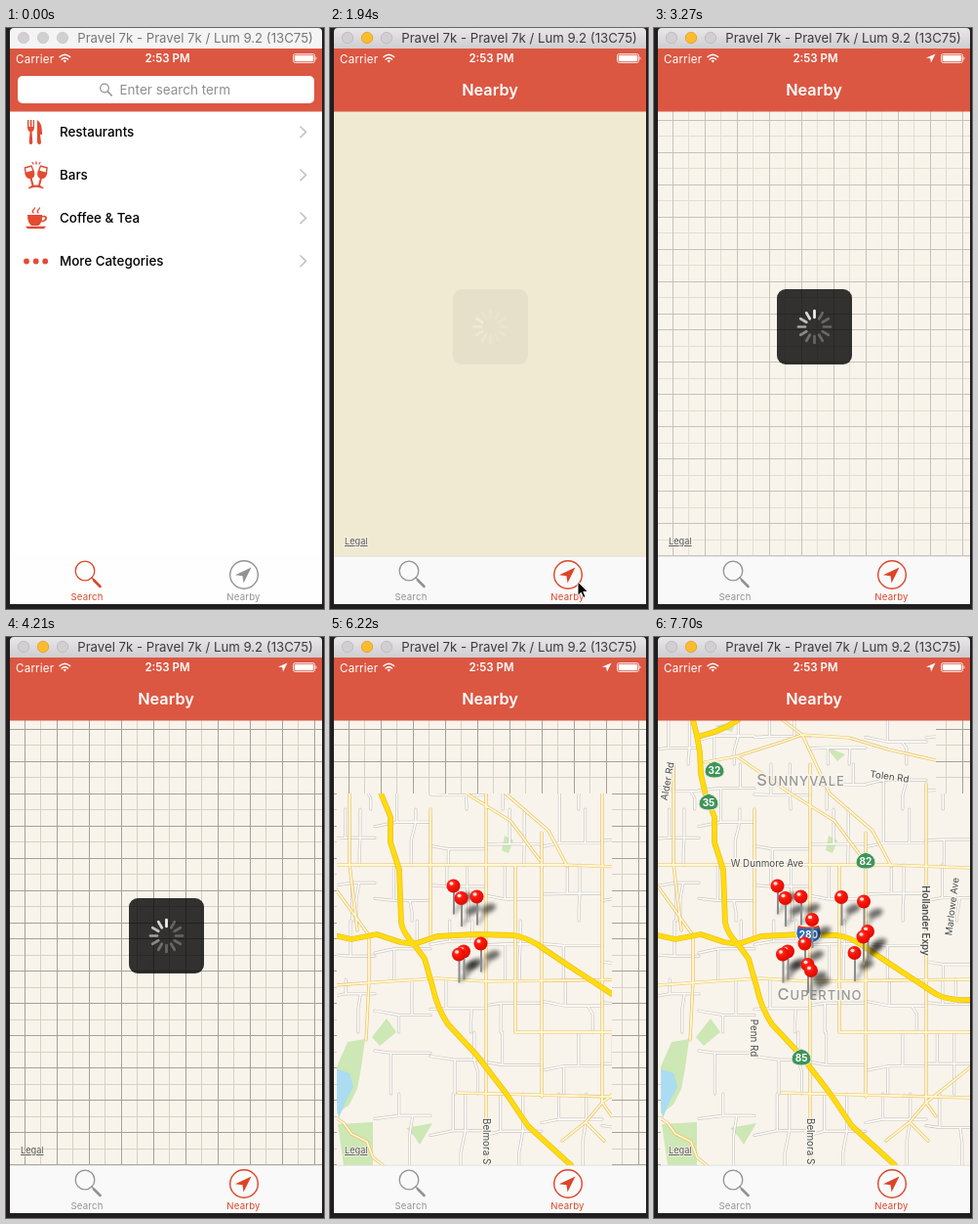
Write an HTML page that moves like this. It is 326 px wide and 594 px high and loops after 7990 ms.

```html
<!DOCTYPE html>
<html lang="en">
<head>
<meta charset="utf-8">
<title>Nearby places</title>
<style>
html, body { margin: 0; width: 100%; height: 100%; overflow: hidden; background: #211e20; }
svg { display: block; width: 326px; height: 594px; font-family: Inter, Roboto, sans-serif; }
.mid { text-anchor: middle; }
.row { font-size: 13.4px; font-weight: 500; fill: #000; }
.tab { font-size: 9.6px; letter-spacing: .2px; text-anchor: middle; }
.road { font-size: 9.8px; fill: #4c4c4c; }
.city { font-size: 13px; font-weight: 500; fill: #979797; letter-spacing: 1px; }
.city tspan { font-size: 16.5px; }
.road, .city { stroke: #f9f6ee; stroke-width: 2.5px; paint-order: stroke; text-anchor: middle; }
.sign { font-size: 10px; font-weight: 700; fill: #fff; text-anchor: middle; }
.line { fill: none; stroke-linecap: round; stroke-linejoin: round; }
</style>
</head>
<body>
<svg viewBox="0 0 326 594">
  <defs>
    <linearGradient id="chrome" x2="0" y2="1"><stop stop-color="#e9e7e9"/><stop offset="1" stop-color="#cfcdcf"/></linearGradient>
    <radialGradient id="ball" cx=".36" cy=".32" r=".75"><stop stop-color="#ff5145"/><stop offset=".4" stop-color="#fb1508"/><stop offset="1" stop-color="#d60b04"/></radialGradient>
    <filter id="soft" x="-60%" y="-60%" width="220%" height="220%"><feGaussianBlur stdDeviation="2.2"/></filter>
    <clipPath id="mapBox"><rect x="4" y="85" width="320" height="455"/></clipPath>
    <clipPath id="tileBox"><path id="tiles"/></clipPath>
  </defs>

  <rect width="326" height="594" fill="#211e20"/>
  <rect x="4" y="21" width="320" height="568" fill="#fff"/>

  <g id="list">
    <g fill="#e34b32">
      <path d="M22 94v8q0 3 2.500 4l-.8 11q0 2 1.800 2t1.800-2l-.8-11q2.500-1 2.500-4v-8h-1.200v7h-1.400v-7h-1.600v7h-1.400v-7z"/>
      <path d="M32 94q5 3 5 13v2h-2l1 8q0 2-1.800 2t-2.200-2z"/>
      <path d="M22 191h15v1q5-1 5 2.500t-6 4q-1 2.500-3 3.500h-7q-4-3-4-11zM37.300 193.500l-.6 3.500q3.300-.6 3.300-2.500t-2.700-1z" fill-rule="evenodd"/>
      <path d="M20 202.800h21l-2 2.400H22z"/>
      <circle cx="21" cy="238.500" r="2.900"/><circle cx="30.700" cy="238.500" r="2.900"/><circle cx="40.200" cy="238.500" r="2.900"/>
      <g id="glass" transform="translate(25 151) rotate(-14)">
        <path d="M-4-10h8l1 7q0 5-4 6v7l4 1.500v1h-10v-1l4-1.500v-7q-4-1-4-6zM-2.800-8.500l-.5 4h6.600l-.5-4z" fill-rule="evenodd"/>
      </g>
      <use href="#glass" transform="matrix(-1 0 0 1 61.500 0)"/>
    </g>
    <path class="line" d="M28 189q-1.500-1.500 0-3t1.500-2M33 189q-1.500-1.500 0-3t1.500-2M28 139l-1-1.500M31 139v-2M34 139l1-1.500" stroke="#e34b32" stroke-width="1.300"/>
    <g class="row">
      <text x="55" y="111">Restaurants</text><text x="55" y="155">Bars</text>
      <text x="55" y="199">Coffee &amp; Tea</text><text x="55" y="243">More Categories</text>
    </g>
    <path class="line" d="M302 101l5.500 5.300-5.500 5.300m0 33.400l5.500 5.300-5.500 5.300m0 33.400l5.500 5.300-5.500 5.300m0 33.400l5.500 5.300-5.500 5.300" stroke="#c4c4c7" stroke-width="1.700"/>
  </g>

  <g id="near" clip-path="url(#mapBox)">
    <rect id="land" x="4" y="85" width="320" height="455"/>
    <g id="grid"></g>
    <g id="map" clip-path="url(#tileBox)"></g>
    <g id="labels">
      <text class="city" x="150.500" y="152"><tspan>S</tspan>UNNYVALE</text>
      <text class="city" x="170" y="371"><tspan>C</tspan>UPERTINO</text>
    </g>
    <text id="street" class="road" style="text-anchor:start" transform="translate(156.500 492) rotate(90)">Belmora St</text>
    <text x="15" y="528" font-size="9.200" fill="#555" text-decoration="underline" stroke="#f8f4ea" stroke-width="1.500" paint-order="stroke">Legal</text>
    <g id="pins"></g>
    <g id="hud"><rect x="126" y="267" width="77" height="77" rx="9" fill-opacity=".8"/></g>
  </g>

  <rect x="4" y="540" width="320" height="49" id="bar"/>
  <path d="M4 540.250H324" stroke="#c9c9c9" stroke-width=".5" id="hair"/>
  <g id="tabSearch">
    <circle cx="81" cy="555" r="9.800" fill="none" stroke="currentColor" stroke-width="1.300"/>
    <path class="line" d="M88 562l2 2" stroke="currentColor" stroke-width="1.300"/>
    <path class="line" d="M90 564.500l6.500 6.500" stroke="currentColor" stroke-width="2.600"/>
    <text class="tab" x="83" y="585.300" fill="currentColor">Search</text>
  </g>
  <g id="tabNear">
    <circle cx="244" cy="559" r="14.300" fill="none" stroke="currentColor" stroke-width="1.400"/>
    <path d="M251.500 551.500l-8 16-1-7.200-7.500-1z" fill="currentColor"/>
    <text class="tab" x="243.500" y="585.300" fill="currentColor">Nearby</text>
  </g>

  <rect x="4" y="21" width="320" height="64.500" fill="#dc5742"/>
  <g fill="#fff">
    <text x="10" y="35.500" font-size="11.600" letter-spacing=".2">Carrier</text>
    <text class="mid" x="165.500" y="35.300" font-size="11.500" font-weight="600">2:53 PM</text>
    <path class="line" d="M55 29.500q5.300-4.600 10.600 0M57.100 32q3.200-2.700 6.400 0" stroke="#fff" stroke-width="1.500"/>
    <path d="M58.600 33.400q1.700-1.300 3.400 0l-1.700 2z"/>
    <rect x="294.500" y="26.500" width="22" height="9" rx="2" fill="none" stroke="#fff" stroke-width=".8"/>
    <rect x="295.700" y="27.700" width="19.600" height="6.600" rx="1"/>
    <path d="M317.500 29.300q2 1.700 0 3.400z"/>
    <path id="gps" d="M288.500 26.500l-4.500 9-.8-4.400-4.200-.6z"/>
    <text id="title" class="mid" x="164" y="69" font-size="16.300" font-weight="600">Nearby</text>
  </g>
  <g id="field">
    <rect x="12" y="49" width="304" height="28" rx="5" fill="#fff"/>
    <circle cx="101" cy="61.500" r="4.300" fill="none" stroke="#8e8e93" stroke-width="1.200"/>
    <path class="line" d="M104.300 65l4 4" stroke="#8e8e93" stroke-width="1.500"/>
    <text x="116.500" y="67.800" font-size="13.500" fill="#8e8e93">Enter search term</text>
  </g>

  <path id="window" d="M4 21V4q0-4 4-4H320q4 0 4 4V21z"/>
  <g stroke-width=".8"><circle cx="18" cy="10" r="5.700" class="dot"/><circle cx="38" cy="10" r="5.700" class="dot"/><circle cx="58" cy="10" r="5.700" class="dot"/></g>
  <text id="caption" class="mid" x="194" y="14.900" font-size="13.200">Pravel 7k - Pravel 7k / Lum 9.2 (13C75)</text>
  <path id="cursor" d="M0 0v14.500l3.400-3.200 2.300 5.200 2.400-1-2.300-5.100h4.600z" stroke="#fff" stroke-width="1"/>
</svg>
<script>
const LOOP = 7990;
const STEPS = [0, 890, 1040, 1640, 1790, 1940, 2090, 2240, 2380, 2530, 2680, 2830, 2980, 3130,
  3280, 3420, 3570, 3720, 3860, 4010, 4210, 4340, 4490, 4630, 4780, 4920, 5070, 5220, 5360,
  5790, 5930, 6080, 6220, 6510, 6650, 6800, 7250, 7700];
const RED = '#dc4527', GRAY = '#929292';

const $ = id => document.getElementById(id);
const clamp = v => Math.max(0, Math.min(1, v));
const ramp = (t, a, b) => clamp((t - a) / (b - a));

function add(parent, tag, attrs, text) {
  const el = document.createElementNS('http://www.w3.org/2000/svg', tag);
  for (const k in attrs) el.setAttribute(k, attrs[k]);
  if (text) el.textContent = text;
  parent.appendChild(el);
  return el;
}
const set = (id, k, v) => $(id).setAttribute(k, v);
const show = (id, on) => set(id, 'visibility', on ? 'visible' : 'hidden');

function seeded(s) {
  return () => (s = (s * 16807) % 2147483647) / 2147483647;
}

// Placeholder grid
function buildGrid() {
  const g = $('grid'), gap = 16.5;
  const line = (d, dark) => add(g, 'path', { d, stroke: dark ? '#a5a199' : '#d6d0c6', 'stroke-width': 1 });
  for (const pass of [false, true]) {
    for (let i = 0; i < 28; i++) {
      const y = Math.floor(94 + i * gap) + .5;
      const dark = (i % 2 === 0) === (y < 300);
      if (dark === pass) line(`M4 ${y}H324`, dark);
    }
    for (let i = -8; i < 11; i++) {
      const dark = i % 2 === 0;
      if (dark === pass) line(`M${Math.floor(151 + i * gap) + .5} 85V540`, dark);
    }
  }
}

// Road map
const FREEWAY = 'M40 85L44 101 47 118 48 140 53 162 62 184 62 210 71 238 73 292Q75 303 86 314L97 329 105 357Q110 380 121 396L150 427 180 466 203 500 247 540'
  + 'M4 305L22 309 48 304 72 312 86 314 110 306 150 304 188 305Q200 307 212 314L240 333 289 365Q302 372 324 371'
  + 'M45 102L62 97 74 92 86 85';
const MAIN = 'M4 233H240L324 236M4 356L60 352 110 349 160 352 324 350M190 404H324M131 466L324 471'
  + 'M103 176V306M160 130V540M217 200V470M279 150V476L289 490M279 476L262 496 238 515M262 496L281 515M279 476L324 440'
  + 'M20 130V232L28 300M40 305V352L37 412M190 234V404M4 255L40 305'
  + 'M52 128L85 122 140 160 185 188 215 228M132 85L152 100 200 103 240 115 324 134M85 122L132 107 152 100M152 100L180 160 224 198 243 234'
  + 'M4 490L14 497 22 508 38 516 44 532 54 540';
const PARKS = 'M58 390L68 404 51 418 43 409ZM18 414L36 411 32 440 28 462 20 478 4 490V446Z'
  + 'M8 498L44 496V540H14Z'
  + 'M78 502L105 497 92 519 86 510ZM179 203L188 208 183 221 176 218ZM62 91L84 86 80 97ZM176 112L196 120 188 127Z';
const WATER = 'M5 441L20 446 24 460 16 475 9 492 5 470Z';

function smallRoads() {
  const rnd = seeded(4211), xs = [4, 46, 103, 160, 217, 279, 324], ys = [85, 130, 176, 233, 290, 350, 404, 467, 540];
  let d = '';
  for (let i = 0; i < 6; i++) for (let j = 0; j < 8; j++) {
    const x = xs[i], y = ys[j], w = xs[i + 1] - x, h = ys[j + 1] - y;
    if (x < 46 && y > 400) continue;
    const a = x + w * (.25 + rnd() * .2), b = y + h * (.3 + rnd() * .4), c = x + w * (.6 + rnd() * .2), k = (rnd() - .5) * 10;
    d += `M${x} ${b}L${a} ${b + k}H${x + w}`;
    d += rnd() < .6 ? `M${a} ${y}V${b + k}` : `M${a} ${b + k}V${y + h}`;
    if (rnd() < .75) d += `M${c} ${b + k}L${c + k} ${b + h * .25}V${y + h}`;
    if (rnd() < .5) d += `M${c} ${y}V${b + k}`;
  }
  return d;
}

function buildMap() {
  const g = $('map');
  const area = (d, fill) => add(g, 'path', { d, fill });
  const road = (d, edge, fill, w) => {
    add(g, 'path', { d, class: 'line', stroke: edge, 'stroke-width': w + 1.4 });
    add(g, 'path', { d, class: 'line', stroke: fill, 'stroke-width': w });
  };
  area('M4 85H324V540H4Z', '#f8f4ec');
  area(PARKS, '#cde7b5');
  area(WATER, '#aadcf2');
  road(smallRoads(), '#cbc7bf', '#fffefc', 1.6);
  road(MAIN, '#ebbd6c', '#fffad0', 1.8);
  road(FREEWAY, '#edbd2a', '#ffdc0e', 4.4);
}

function buildLabels() {
  const g = $('labels');
  const signs = [[62, 136, 32], [56, 169, 35], [217, 229, 82], [151, 430, 85]];
  for (const [x, y, n] of signs) {
    add(g, 'path', { d: `M${x} ${y - 9}Q${x + 10} ${y - 6} ${x + 10} ${y + 2}Q${x + 9} ${y + 8} ${x} ${y + 8}Q${x - 9} ${y + 8} ${x - 10} ${y + 2}Q${x - 10} ${y - 6} ${x} ${y - 9}Z`, fill: '#3f9459', stroke: '#e4ece2' });
    add(g, 'text', { x, y: y + 4, class: 'sign' }, n);
  }
  add(g, 'path', { d: 'M148 295Q158 298 169 295Q174 304 168 310L158.500 315 149 310Q143 304 148 295Z', fill: '#2867b8', stroke: '#fff' });
  add(g, 'path', { d: 'M148 295Q158 298 169 295L170 298H147Z', fill: '#d8402f' });
  add(g, 'text', { x: 158.5, y: 308, class: 'sign' }, 280);
  const names = [[17, 148, -80, 'Alder Rd'], [241, 146, 8, 'Tolen Rd'], [116, 235, 0, 'W Dunmore Ave'],
    [99, 410, 90, 'Penn Rd'], [275, 290, 90, 'Hollander Expy'], [309, 276, -83, 'Marlowe Ave']];
  for (const [x, y, turn, name] of names) {
    add(g, 'text', { class: 'road', transform: `translate(${x} ${y}) rotate(${turn})`, 'font-weight': name.endsWith('Expy') ? 600 : 400 }, name);
  }
}

// Pins: x, y, wave
const PINS = [[126.5, 254.5, 0], [150.5, 265.5, 0], [134.5, 267, 0], [154.5, 313.5, 0], [137, 321.5, 0], [132, 324.5, 0],
  [192, 266, 1], [215, 270.5, 1], [162, 289, 1], [219, 301, 1], [214.5, 306.5, 1], [205.5, 323, 1], [157.5, 335, 1], [161, 341, 1]];
const WAVES = [{ at: 5800, drop: 210, gap: 18 }, { at: 6440, drop: 120, gap: 7 }];

function buildPins() {
  const shades = add($('pins'), 'g', {}), bodies = add($('pins'), 'g', {});
  return PINS.map(([x, y, wave], i) => {
    const shade = add(shades, 'g', { filter: 'url(#soft)', opacity: .55 });
    add(shade, 'path', { d: `M${x + 1} ${y + 28}L${x + 11} ${y + 14}`, stroke: '#000', 'stroke-width': 2 });
    add(shade, 'ellipse', { rx: 8, ry: 4.2, transform: `translate(${x + 12} ${y + 12}) rotate(-22)` });
    const body = add(bodies, 'g', {});
    add(body, 'path', { d: `M${x + .5} ${y + 5}V${y + 29}`, stroke: '#8c8c8c', 'stroke-width': 2 });
    add(body, 'circle', { cx: x, cy: y, r: 7, fill: 'url(#ball)' });
    add(body, 'ellipse', { cx: x - 2, cy: y - 2.5, rx: 2, ry: 1.7, fill: '#fff', opacity: .85 });
    return { shade, body, wave: WAVES[wave], delay: WAVES[wave].gap * (i % 6) };
  });
}

function movePins(t) {
  for (const { shade, body, wave, delay } of pins) {
    const start = wave.at + delay, k = ramp(t, start, start + 300), up = wave.drop * (1 - k * k);
    const vis = t >= start ? 'visible' : 'hidden';
    body.setAttribute('visibility', vis);
    shade.setAttribute('visibility', vis);
    body.setAttribute('transform', `translate(0 ${-up})`);
    shade.setAttribute('transform', `translate(${up * .6} ${-up * .5})`);
  }
}

// Spinner
function buildSpokes() {
  return Array.from({ length: 12 }, (_, i) => add($('hud'), 'path', {
    d: 'M0-9.500V-16.500', class: 'line', stroke: '#fff', 'stroke-width': 2.7, transform: `translate(164.500 305.500) rotate(${i * 30})`
  }));
}
function spin(t) {
  const head = Math.round(5 + (t - 2530) * .01131 + 24) % 12;
  spokes.forEach((s, i) => s.setAttribute('opacity', Math.max(.26, .95 - .13 * ((head - i + 12) % 12))));
}

function tilePath(t) {
  let d = '';
  if (t >= 5070) d += 'M7 441H289V540H7Z';
  if (t >= 5790) d += 'M7 160H289V441H7Z';
  if (t >= 6510) d += 'M289 160H324V441H289Z';
  if (t >= 7250) d += 'M4 85H289V441H4Z';
  if (t >= 7700) d += 'M289 441H324V540H289Z';
  return d;
}

function cursorAt(t) {
  if (t < 890 || t >= 2830) return null;
  if (t < 1040) return [252, 571];
  if (t < 2240) return [254, 566];
  return t < 2380 ? [252, 563] : t < 2530 ? [248, 556] : [245, 551];
}

function hudAlpha(t) {
  return t < 3000 ? ramp(t, 1925, 2225) : 1 - ramp(t, 5070, 5364);
}

function draw(t) {
  const active = t >= 1640, near = t >= 1790;
  for (const id of ['list', 'field']) show(id, !near);
  for (const id of ['title', 'hair']) show(id, near);
  $('near').style.display = near ? '' : 'none';
  set('bar', 'fill', near ? '#f9f9f9' : '#fefefe');
  set('tabSearch', 'color', near ? GRAY : RED);
  set('tabNear', 'color', near ? RED : GRAY);
  set('window', 'fill', active ? 'url(#chrome)' : '#f5f4f5');
  set('caption', 'fill', active ? '#3d3c3d' : '#777');
  document.querySelectorAll('.dot').forEach((dot, i) => {
    const amber = active && i === 1;
    dot.setAttribute('fill', amber ? '#fdbc30' : '#d1cfd1');
    dot.setAttribute('stroke', amber ? '#dfa023' : active ? '#b9b7b9' : '#cac8ca');
  });
  const warm = ramp(t, 1940, 2600);
  set('land', 'fill', `rgb(${241 + 8 * warm},${234 + 10 * warm},${211 + 24 * warm})`);
  set('grid', 'opacity', ramp(t, 2900, 3280));
  show('gps', t >= 2980);
  set('tiles', 'd', tilePath(t));
  $('labels').style.display = t >= 7700 ? '' : 'none';
  $('street').style.display = t >= 5790 ? '' : 'none';
  set('hud', 'opacity', hudAlpha(t));
  spin(t);
  movePins(t);
  const tip = cursorAt(t);
  show('cursor', tip);
  if (tip) set('cursor', 'transform', `translate(${tip})`);
}

buildGrid();
buildMap();
buildLabels();
const pins = buildPins(), spokes = buildSpokes();
const begin = performance.now();
let last = -1;

function tick() {
  const t = (performance.now() - begin) % LOOP;
  const step = STEPS.findLast(s => s <= t);
  if (step !== last) draw(last = step);
  requestAnimationFrame(tick);
}
tick();
</script>
</body>
</html>
```
